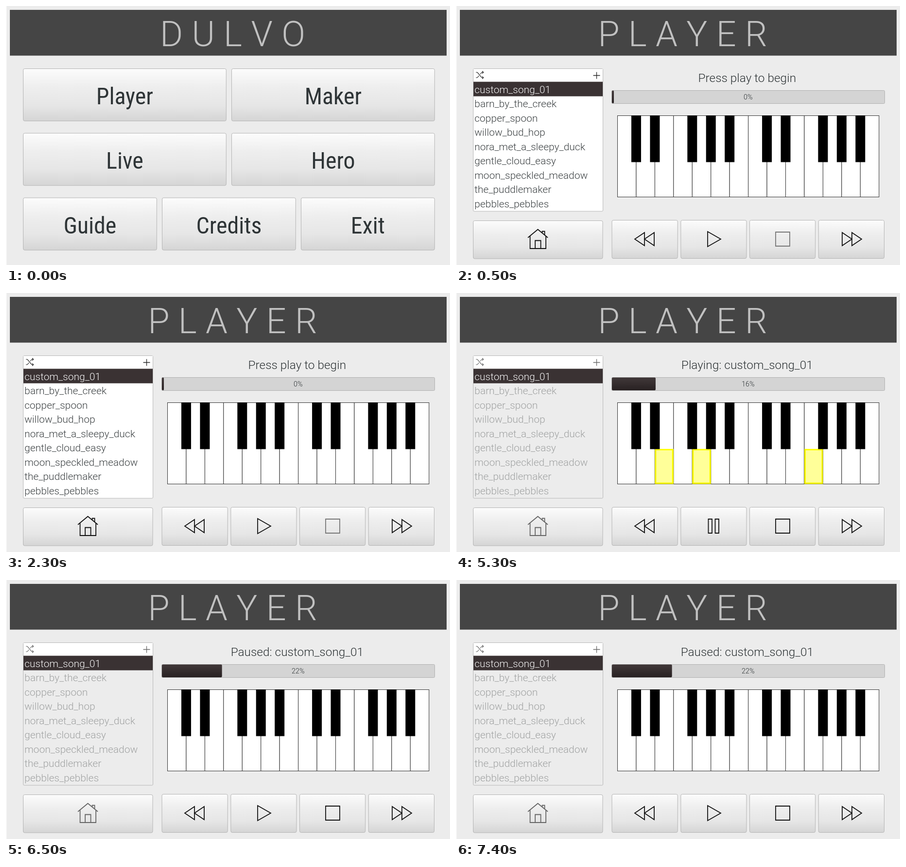
Write an HTML page that moves like this. It is 914 px wide and 535 px high and loops after 8000 ms.

```html
<!DOCTYPE html>
<html lang="en">
<head>
<meta charset="utf-8">
<title>Keyboard player</title>
<style>
  html, body { margin: 0; width: 100%; height: 100%; overflow: hidden; background: #ececec; }
  svg { display: block; width: 914px; height: 535px; }
  text { font-family: Roboto, sans-serif; font-weight: 300; white-space: pre; }
  .title { font-size: 72px; letter-spacing: 18.3px; font-kerning: none; fill: #c1c1c1; }
  .menu { font-family: "Roboto Condensed", Roboto, sans-serif; font-stretch: 75%; font-weight: 400; font-size: 48px; fill: #2e3436; }
  .song { font-size: 21px; }
  .status { font-size: 24.4px; fill: #2e3436; }
  .percent { font-size: 14.4px; fill: #2e3436; }
  .icon { fill: none; stroke-width: 1.8; stroke-linejoin: miter; }
</style>
</head>
<body>
<svg id="stage" viewBox="0 0 914 535">
  <defs>
    <linearGradient id="face" x2="0" y2="1">
      <stop offset="0" stop-color="#fcfcfc"/>
      <stop offset=".35" stop-color="#eeeeee"/>
      <stop offset=".7" stop-color="#e6e6e6"/>
      <stop offset="1" stop-color="#d5d5d5"/>
    </linearGradient>
    <linearGradient id="bar" x2="0" y2="1">
      <stop offset="0" stop-color="#413839"/>
      <stop offset="1" stop-color="#282122"/>
    </linearGradient>
  </defs>
  <rect width="914" height="535" fill="#ececec"/>
  <rect width="1" height="535" fill="#fff"/>
  <rect x="8" y="8" width="899" height="94.5" fill="#454545"/>
  <g id="view"></g>
</svg>
<script>
const LOOP = 8000;
const SONGS = ["custom_song_01", "barn_by_the_creek", "copper_spoon", "willow_bud_hop",
  "nora_met_a_sleepy_duck", "gentle_cloud_easy", "moon_speckled_meadow",
  "the_puddlemaker", "pebbles_pebbles"];
const STEPS = [
  { at: 0, menu: true },
  { at: 500, status: "Press play to begin", done: 0, idle: true, notes: [] },
  { at: 3500, status: "Playing: custom_song_01", done: .16, playing: true, notes: [2, 4, 10] },
  { at: 6500, status: "Paused: custom_song_01", done: .22, notes: [] }
];

const rect = (x, y, w, h, attrs) => `<rect x="${x}" y="${y}" width="${w}" height="${h}" ${attrs}/>`;
const text = (x, y, kind, str, attrs = 'text-anchor="middle"') =>
  `<text x="${x}" y="${y}" class="${kind}" ${attrs}>${str}</text>`;
const icon = (d, color = "#111", attrs = "") => `<path class="icon" d="${d}" stroke="${color}" ${attrs}/>`;
const title = str => text(475.6, 83, "title", str);

function button(x, y, w, h, label) {
  return rect(x, y, w, h, 'rx="3" fill="url(#face)" stroke="#b4b4b4"') +
    (label ? text(x + w / 2, y + 73.5, "menu", label) : "");
}

function menu() {
  const row = (y, w, labels) =>
    labels.map((label, i) => button(35.5 + i * (w + 11.2), y, w, 108, label)).join("");
  return title("DULVO") +
    row(129.5, 417.8, ["Player", "Maker"]) +
    row(262.8, 417.8, ["Live", "Hero"]) +
    row(396.2, 274.8, ["Guide", "Credits", "Exit"]);
}

function songList(idle) {
  const ink = idle ? "#222" : "#666";
  const rows = SONGS.map((name, i) => text(38, 180 + i * 29.45, "song", name,
    `fill="${i === 0 ? "#f4f4f4" : idle ? "#3c4143" : "#a0a2a2"}"`)).join("");
  return rect(35.5, 129.5, 267, 294.5, `rx="2" fill="${idle ? "#fff" : "#ececec"}" stroke="#b8b8b8"`) +
    rect(36, 130, 266, 26.5, 'fill="#fff"') +
    rect(36, 156.5, 266, 30, 'fill="#3a3233"') +
    icon("M41 137h3l9 11h3M41 148h3l3-4M50 141l3-4h3M54 134.5l2.5 2.5-2.5 2.5M54 145.5l2.5 2.5-2.5 2.5",
      ink, 'style="stroke-width:1.2"') +
    icon("M282.5 143.5h14M289.5 136.5v14", ink, 'style="stroke-width:1.3"') + rows;
}

function progress(done) {
  return rect(320.5, 174.5, 562, 27, 'rx="2" fill="#d4d4d4" stroke="#b0b0b0"') +
    rect(321, 174.5, Math.max(4, 562 * done), 26.5, 'rx="2" fill="url(#bar)"') +
    text(601.3, 193.2, "percent", Math.round(done * 100) + "%");
}

function piano(notes) {
  const left = 332.5, w = 38.45;
  let out = "";
  for (let k = 0; k < 14; k++)
    out += rect(left + k * w, 226.5, w, 168, 'fill="#fff" stroke="#333"');
  for (const k of notes)
    out += rect(left + k * w + 1.5, 323.5, w - 3, 69.5, 'fill="#ffff99" stroke="#ff0" stroke-width="3"');
  for (let k = 1; k < 14; k++)
    if (k % 7 !== 0 && k % 7 !== 3)
      out += rect(left + k * w - 10, 226, 20, 96.5, 'fill="#000"');
  return out;
}

function controls({ idle, playing }) {
  const house = "M148 478.5L168.5 461.5 189 478.5M152.5 475.5V501H185V475.5M163 501V484.5H174.5V501M177.5 468.5V465.5H182.5V472.5";
  const play = "M518 466L545 481.5 518 497Z";
  const pause = "M519.5 467h7.5v29h-7.5ZM533.5 467h7.5v29h-7.5Z";
  return button(35.5, 443.5, 266.5, 78.5) +
    [321, 462.8, 604.5, 746.3].map(x => button(x, 442.5, 135.2, 79)).join("") +
    icon(house, idle ? "#111" : "#666") +
    icon("M388 468V495L368 481.5ZM408 468V495L388 481.5Z") +
    icon(playing ? pause : play) +
    icon("M658 467h29v29h-29Z", idle ? "#777" : "#111") +
    icon("M795 468V495L815 481.5ZM815 468V495L835 481.5Z");
}

function player(step) {
  return title("PLAYER") + songList(step.idle) +
    text(599.3, 157, "status", step.status) +
    progress(step.done) + piano(step.notes) + controls(step);
}

const view = document.getElementById("view");
const start = performance.now();
let shown;

function tick() {
  const t = (performance.now() - start) % LOOP;
  const step = STEPS.findLast(s => s.at <= t);
  if (step !== shown) {
    view.innerHTML = step.menu ? menu() : player(step);
    shown = step;
  }
  requestAnimationFrame(tick);
}
tick();
</script>
</body>
</html>
```
